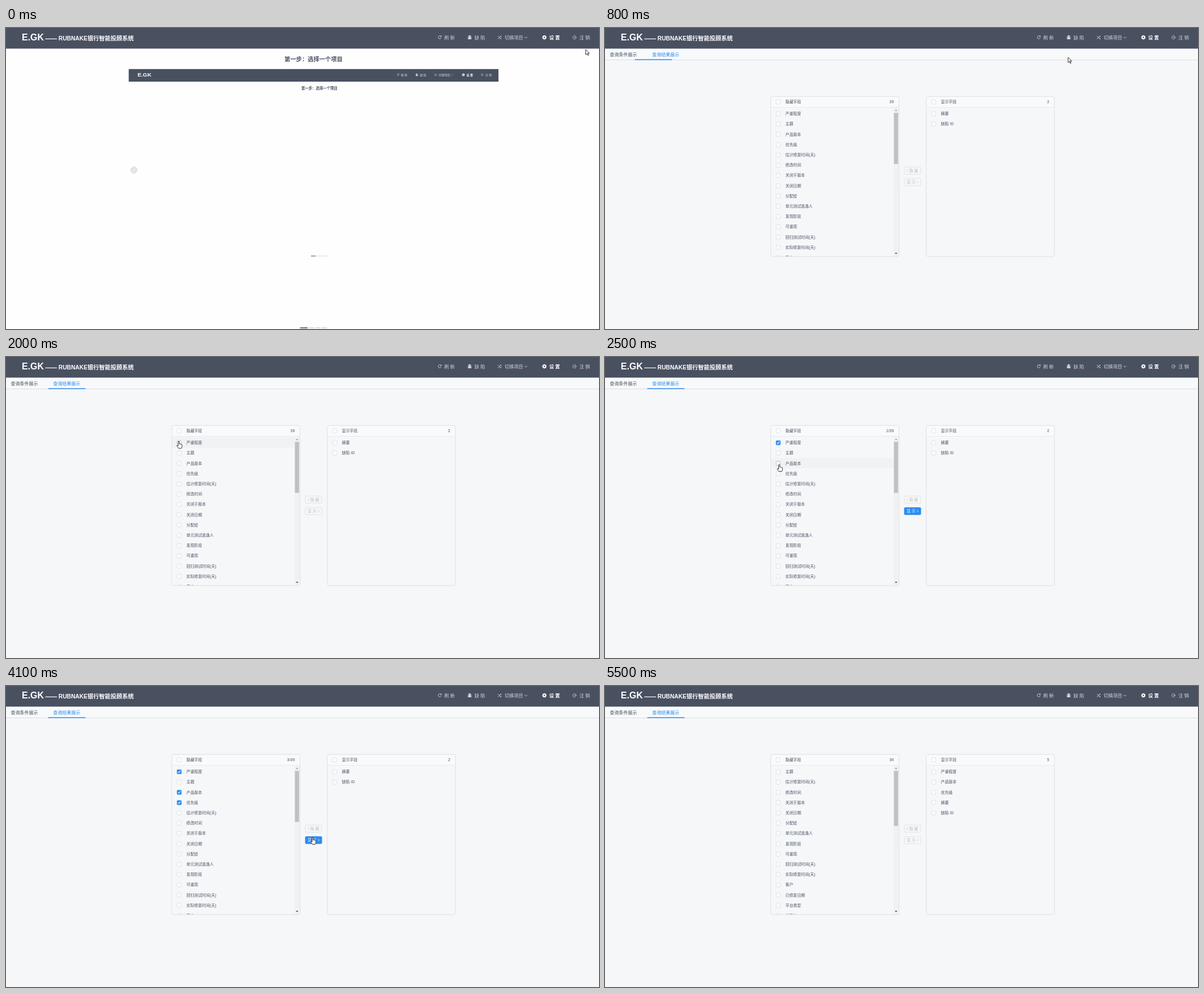
Animation, 1050 px wide and 533 px high, one loop 6100 ms. Source, as an HTML page:

```html
<!DOCTYPE html>
<html lang="zh-CN">
<head>
<meta charset="utf-8">
<title>字段设置</title>
<style>
  html, body { margin: 0; width: 100%; height: 100%; overflow: hidden; background: #fefefe; }
  svg { display: block; width: 1050px; height: 533px; }
  text { font-family: "Liberation Sans", "Noto Sans CJK SC", "Noto Sans CJK", sans-serif; white-space: pre; }
</style>
</head>
<body>
<svg id="stage" viewBox="0 0 1050 533"></svg>
<script>
const LOOP = 6100, STEP = 100, ROW = 18.2, ROWS_TOP = 142.4;
const INK = '#495060', BLUE = '#2d8cf0', LINE = '#dddee1', PAGE = '#f5f7f9';
const stage = document.getElementById('stage');

const fields = ['严重程度', '主题', '产品版本', '优先级', '估计修复时间(天)', '修改时间', '关闭于版本',
  '关闭日期', '分配给', '单元测试逃逸人', '发现阶段', '可重现', '回归测试时间(天)', '实际修复时间(天)',
  '客户', '已修复日期', '平台类型', '创建人'];
const shown = ['摘要', '缺陷 ID'];
const picks = [[2200, 0], [2700, 2], [3200, 3]];
const MOVED = 4200, OPENED = 500, LOADED = 800;

// time, x, y, pointer kind (a = arrow, h = hand, - = hidden)
const path = [
  [0, 1026.5, 38, 'a'], [100, 1018, 34, 'a'], [200, 1000, 28, 'a'], [300, 980, 22, 'h'], [400, 969, 20, 'h'],
  [600, 969, 20, 'h'], [700, 947, 33, 'a'], [800, 820, 52, 'a'], [900, 610, 90, 'a'], [1000, 480, 130, 'a'],
  [1100, 400, 178, 'h'], [1200, 366, 210, 'h'], [1300, 354.5, 226.5, 'h'], [1400, 354.5, 226.5, 'h'],
  [1600, 343, 203, 'h'], [1800, 314, 158, 'h'], [1900, 303, 141, 'h'], [2000, 306, 149, 'h'],
  [2200, 306, 149, 'h'], [2300, 306.5, 158, 'h'], [2500, 308.5, 190, 'h'], [2700, 308.5, 190, 'h'],
  [2900, 308, 211, 'h'], [3500, 308, 211, 'h'], [3600, 348, 221, 'h'], [3700, 445, 243, 'a'],
  [3800, 537, 262, 'a'], [3900, 543, 267, 'h'], [4200, 543, 268, 'h'], [4300, 533, 272, 'a'],
  [4400, 516.5, 271, 'a'], [4500, 517, 276, 'a'], [4600, 540, 279, 'a'], [4800, 690, 235, 'a'],
  [5000, 900, 160, 'a'], [5100, 952, 137, 'a'], [5200, 935, 142, 'a'], [5300, 978, 130, 'a'],
  [5400, 1019, 120, 'a'], [5500, 1050, 115, '-']
];

function pointerAt(time) {
  let i = path.length - 1;
  while (path[i][0] > time) i--;
  const a = path[i], b = path[i + 1] || a;
  const k = b === a ? 0 : (time - a[0]) / (b[0] - a[0]);
  return { x: a[1] + (b[1] - a[1]) * k, y: a[2] + (b[2] - a[2]) * k, kind: a[3] };
}

const text = (x, y, str, size, fill = INK, extra = '') =>
  `<text x="${x}" y="${y}" font-size="${size}" fill="${fill}" ${extra}>${str}</text>`;
const rect = (x, y, w, h, fill, extra = '') =>
  `<rect x="${x}" y="${y}" width="${w}" height="${h}" fill="${fill}" ${extra}/>`;
const stroke = (d, color, width = 1, extra = '') =>
  `<path d="${d}" fill="none" stroke="${color}" stroke-width="${width}" ${extra}/>`;
const BOLD = 'font-weight="700"', END = 'text-anchor="end"', MID = 'text-anchor="middle"';

function gear(x, y) {
  const teeth = [0, 45, 90, 135].map(a =>
    rect(x - 1, y - 3.7, 2, 7.4, '#fff', `transform="rotate(${a} ${x} ${y})"`)).join('');
  return teeth + `<circle cx="${x}" cy="${y}" r="2.1" fill="${INK}" stroke="#fff" stroke-width="1.6"/>`;
}

function bar() {
  const soft = '#d3d6da';
  return text(28, 22.4, 'E.GK', 16, '#fff', BOLD)
    + stroke('M770.3 14.9A2.7 2.7 0 1 0 770.7 17.2M770.9 13.3V15.4H768.8', soft, .9)
    + text(776, 20.1, '刷 新', 8.2, soft)
    + rect(818.4, 15.6, 5.2, 4.4, soft, 'rx="1.6"') + rect(819, 13, 4, 2, soft, 'rx="1"')
    + stroke('M817.3 15.2H824.7M817.3 17.6H824.7M817.6 19.5H824.4', soft, .7)
    + text(829.5, 20.1, '缺 陷', 8.2, soft)
    + stroke('M870.8 14.8H872.2L875.2 18.8H877M870.8 18.8H872.2L875.2 14.8H877M875.8 13.5L877.1 14.8L875.8 16.1M875.8 17.5L877.1 18.8L875.8 20.1', soft, .8)
    + text(883, 20.1, '切换项目', 8.2, soft)
    + stroke('M918 15.6L920.5 18.1L923 15.6', soft, .9)
    + gear(953.3, 16.6) + text(962, 20.1, '设 置', 8.2, '#fff', BOLD)
    + stroke('M1009 14.9A3 3 0 1 0 1009 18.3M1005.5 16.6H1010M1008.8 15.4L1010 16.6L1008.8 17.8', soft, .8)
    + text(1015.3, 20.1, '注 销', 8.2, soft);
}

const heading = text(544.5, 58.6, '第一步：选择一个项目', 10.3, INK, BOLD + MID);

const header = rect(0, 0, 1050, 36.5, INK) + bar()
  + rect(69.5, 18.7, 20.8, 1.2, '#fff')
  + text(93, 22.2, 'RUBNAKE', 10.25, '#fff', BOLD)
  + text(144.2, 22.2, '银行智能投顾系统', 10.25, '#fff', BOLD);

function dots(x, y, k) {
  return [0, 1, 2, 3].map(i => rect(x + (i ? 4.2 + i * 11.4 : 0) * k, y, (i ? 9.2 : 13.4) * k, 1.6 * k,
    i ? '#cfd2d7' : INK)).join('');
}

const welcome = rect(0, 0, 1050, 533, '#fefefe') + heading
  + rect(217.3, 72.7, 654.7, 22.3, INK)
  + `<g transform="translate(215.5 72.5) scale(.6235)">${bar()}${heading}</g>`
  + '<circle cx="226.6" cy="251.5" r="6.4" fill="#e3e4e5"/>'
  + stroke('M227.5 249.7L225.7 251.5L227.5 253.3', '#fff', .8)
  + dots(540, 403.3, .63) + dots(520.8, 530.2, 1);

function box(x, cy, on, hover) {
  const y = cy - 4;
  return rect(x + .4, y + .4, 7.4, 7.4, on ? BLUE : '#fff',
    `fill-opacity="${on ? 1 : .55}" rx="1" stroke="${on ? BLUE : hover ? '#b4b7bc' : LINE}" stroke-width=".8"`)
    + (on ? stroke(`M${x + 2} ${cy}L${x + 3.6} ${cy + 1.6}L${x + 6.4} ${cy - 1.7}`, '#fff', 1.1) : '');
}

function scrollbar(x, length) {
  return rect(x, 141, 8.6, 263, '#f1f1f1') + rect(x + .6, 150.3, 7.4, length, '#c1c1c1')
    + `<path d="M${x + 2.2} 147l2.2-2.4 2.2 2.4z" fill="#a3a3a3"/>`
    + `<path d="M${x + 2.2} 398l2.2 2.4 2.2-2.4z" fill="#505050"/>`;
}

function panel(x, title, count, items, { checked = [], hover = -1, thumb = 0 } = {}) {
  let out = rect(x + .5, 121.2, 227, 283.6, PAGE, 'rx="3"')
    + rect(x + .5, 121.2, 227, 19.3, '#f9fafb', 'rx="3"')
    + rect(x + 1, 140.2, 226, .8, '#e6e8ec')
    + box(x + 9.6, 130.8)
    + text(x + 26.5, 133.3, title, 6.9)
    + text(x + 218.4, 133.2, count, 7, INK, END);
  if (!items.length) out += text(x + 114, 150.2, '列表为空', 6.9, '#bbbec4', MID);
  out += '<g clip-path="url(#listClip)">' + items.slice(0, 15).map((name, i) => {
    const cy = ROWS_TOP + (i + .5) * ROW;
    return (i === hover ? rect(x + 1, cy - 9.1, 217, ROW, '#f1f2f3') : '')
      + box(x + 9.6, cy + .3, checked.includes(i), i === hover) + text(x + 26.5, cy + 2.7, name, 6.9);
  }).join('') + '</g>';
  if (thumb) out += scrollbar(x + 218, thumb);
  return out + rect(x + .5, 121.2, 227, 283.6, 'none', `rx="3" stroke="${LINE}" stroke-width=".9"`);
}

function button(x, y, label, active, left) {
  const color = active ? '#fff' : '#bbbec4', cy = y + 6.6;
  const arrow = left ? `M${x + 6.6} ${cy - 2}l-1.8 2 1.8 2` : `M${x + 23.2} ${cy - 2}l1.8 2-1.8 2`;
  return rect(x + .4, y + .4, 29.2, 12.6, active ? BLUE : '#f7f7f7',
    `rx="1.5" stroke="${active ? BLUE : LINE}" stroke-width=".8"`)
    + stroke(arrow, color, .8) + text(x + (left ? 9.2 : 4.6), y + 9.2, label, 6.9, color);
}

function settings(time, pointer) {
  const loaded = time >= LOADED, moved = time >= MOVED;
  const checked = moved ? [] : picks.filter(p => time >= p[0]).map(p => p[1]);
  const picked = picks.map(p => p[1]);
  const hidden = !loaded ? [] : moved ? fields.filter((_, i) => !picked.includes(i)) : fields;
  const visible = !loaded ? [] : moved ? [...picked.map(i => fields[i]), ...shown] : shown;
  const total = loaded ? (moved ? 36 : 39) : 0;
  const x = loaded ? 293 : 274.5;
  const overList = pointer.kind === 'h' && pointer.x > x && pointer.x < x + 218 && pointer.y > ROWS_TOP;
  const hover = overList ? Math.floor((pointer.y - ROWS_TOP) / ROW) : -1;
  const p = Math.min(1, Math.max(0, (time - 600) / 300));
  const slide = 74.7 * (p * p * (3 - 2 * p) * .5 + p * .5);

  return rect(0, 36, 1050, 497, PAGE) + rect(0, 36.5, 1050, 20, '#f7f9fa')
    + rect(0, 56, 1050, .9, '#d9dce0')
    + text(8.5, 49.5, '查询条件展示', 8) + text(83.4, 49.5, '查询结果展示', 8, BLUE)
    + rect(slide, 55.3, 66, 1.5, BLUE)
    + panel(x, '隐藏字段', checked.length ? `${checked.length}/${total}` : total, hidden,
      { checked, hover, thumb: loaded && (moved ? 97.5 : 90.3) })
    + panel(x + 275.3, '显示字段', visible.length, visible)
    + button(x + 236.6, 245.8, '隐 藏', false, true)
    + button(x + 236.6, 266.2, '显 示', checked.length > 0, false);
}

function cursor({ x, y, kind }) {
  const shape = {
    a: 'M0 0V9.2L2.2 7.2L3.8 10.6L5.2 10L3.7 6.7H6.6Z',
    h: 'M-1 .8Q0-.6 1 .8V5Q2.2 4.2 2.9 5.3Q4.1 4.7 4.5 5.8Q5.6 5.4 5.7 6.6V9.2Q5.6 11 4.6 12.7H-.6Q-1.8 10.6-3.6 8.3Q-3.9 6.5-1 8.2Z'
  }[kind];
  if (!shape) return '';
  return `<path transform="translate(${x} ${y})" d="${shape}" fill="#fff" stroke="#1c1c1c" stroke-width=".9" stroke-linejoin="round"/>`;
}

const defs = '<defs><clipPath id="listClip"><rect x="0" y="141" width="1050" height="263.4"/></clipPath></defs>';

function draw(time) {
  const pointer = pointerAt(time);
  stage.innerHTML = defs + (time < OPENED ? welcome : settings(time, pointer)) + header + cursor(pointer);
}

const start = performance.now();
let last = -1;
function tick() {
  const time = Math.floor(((performance.now() - start) % LOOP) / STEP) * STEP;
  if (time !== last) draw(last = time);
  requestAnimationFrame(tick);
}
tick();
</script>
</body>
</html>
```
